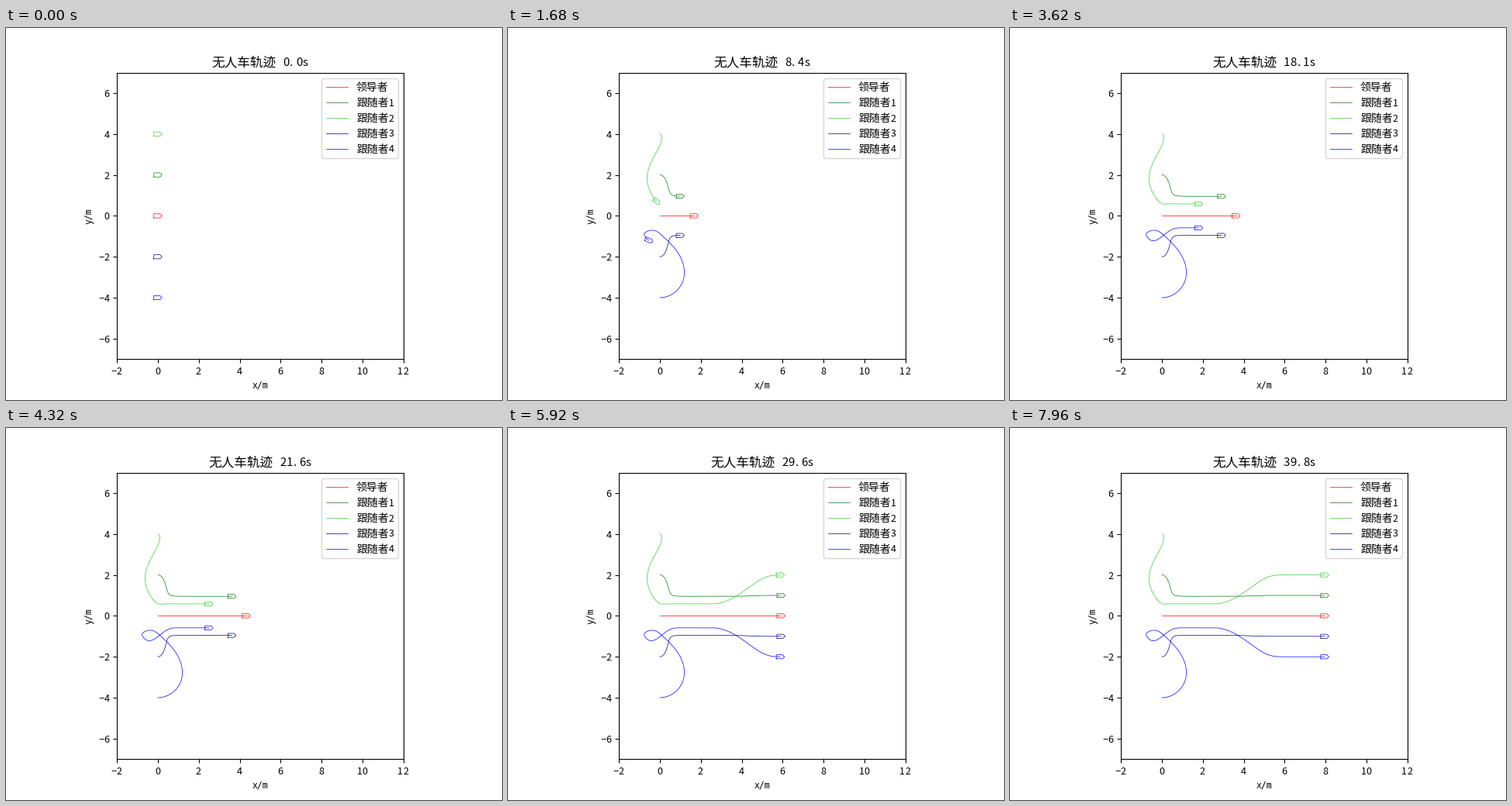
A matplotlib script that plays this animation: 640x480 px, repeating every 7980 ms.

```python
import numpy as np
import matplotlib.pyplot as plt
from matplotlib.animation import FuncAnimation
from matplotlib.patches import FancyBboxPatch

FRAMES, INTERVAL, DT = 399, 20, 0.1
SPEED, REGROUP = 0.2, 22     # leader speed in m/s, time of the second formation
UNIT = 26.4                  # pixels per metre
EM = 100 / 72                # pixels per point
CJK, SANS, MONO = "Noto Sans CJK JP", "Liberation Sans", "DejaVu Sans Mono"
COLORS = ["red", "green", "limegreen", "darkblue", "blue"]
NAMES = ["领导者", "跟随者1", "跟随者2", "跟随者3", "跟随者4"]
BODY = np.array([(-.2, -.1), (-.2, .1), (.1, .1), (.2, 0), (.1, -.1), (-.2, -.1)])

T = np.arange(FRAMES)[:, None] * DT
LEADER = np.hstack([SPEED * T, 0 * T])


def fade(t, tau, power):
    """Falls smoothly from 1 to 0, per axis."""
    return np.exp(-(np.maximum(t, 0) / np.array(tau)) ** np.array(power))


def slot(near, far, tau, power):
    """Place in the formation: the wedge opens into a line abreast."""
    near, far = np.array(near), np.array(far)
    return LEADER + far + (near - far) * fade(T - REGROUP, tau, power)


def spline(keys, v0, v1):
    """Smooth cubic curve through (time, x, y) keys with given end velocities."""
    keys = np.array(keys, float)
    kt, p = keys[:, 0], keys[:, 1:]
    h = np.diff(kt)
    d = np.diff(p, axis=0) / h[:, None]
    a, m = np.eye(len(kt)), np.zeros_like(p)
    m[0], m[-1] = v0, v1
    for i in range(1, len(kt) - 1):
        a[i, i - 1:i + 2] = h[i], 2 * (h[i - 1] + h[i]), h[i - 1]
        m[i] = 3 * (h[i] * d[i - 1] + h[i - 1] * d[i])
    m = np.linalg.solve(a, m)
    k = np.clip(np.searchsorted(kt, T[:, 0], side="right") - 1, 0, len(h) - 1)
    hk = h[k][:, None]
    s = (T - kt[k][:, None]) / hk
    return (p[k] * (1 - s) + p[k + 1] * s
            + s * (1 - s) * hk * ((m[k] - d[k]) * (1 - s) - (m[k + 1] - d[k]) * s))


def inner(side, tau_y):
    near = np.array([-.7, .955 * side])
    start = np.array([0, 2 * side])
    path = slot(near, (0, side), 1.85, 1.9)
    return path + (start - near) * fade(T, (4.74, tau_y), (2.3, 2))


def outer(side, keys, v0, join):
    near = (-1.82, .585 * side)
    path = slot(near, (0, 2 * side), (3.28, 3.45), (1.65, 2.5))
    end = (join, SPEED * join + near[0], near[1])
    entry = spline([(0, 0, 4 * side), *keys, end], (v0, 0), (SPEED, 0))
    return np.where(T < join, entry, path)


def heading(path):
    dx, dy = np.gradient(path, axis=0, edge_order=2).T
    return np.arctan2(dy, dx)


PATHS = [
    LEADER,
    inner(1, 3.45),
    outer(1, [(2, .085, 3.71), (4, -.19, 3.08), (6, -.625, 1.91),
              (8.4, -.15, .70)], .12, 10.5),
    inner(-1, 3.2),
    outer(-1, [(2, 1.08, -3.30), (4, 1.0, -2.01), (6, .095, -.95),
               (7, -.455, -.71), (7.5, -.755, -.86), (8, -.675, -1.09),
               (9, -.31, -1.20), (10.4, .17, -.875)], .7, 13.6),
]
ROUTES = [(path, heading(path)) for path in PATHS]

fig = plt.figure(figsize=(6.4, 4.8), dpi=100, facecolor="white")
ax = fig.add_subplot()
ax.set(xlim=(-2, 12), ylim=(-7, 7), aspect="equal",
       xticks=range(-2, 13, 2), yticks=range(-6, 7, 2))
ax.tick_params(labelbottom=False, labelleft=False)


def data(x, y):
    """Stage pixels (y down) to axes data."""
    return (x - 196) / UNIT, (242.4 - y) / UNIT


def write(x, y, s, size, family=CJK, ha="left", va="baseline", **kw):
    return ax.text(*data(x, y), s, fontsize=size, family=family,
                   ha=ha, va=va, zorder=6, **kw)


def cell_x(left, i, c, size):
    """Anchor of character i on a half-width grid."""
    return left + (i + (.1 if c == "." else .5)) * size * EM / 2


def cells(left, y, s, size):
    return [write(cell_x(left, i, c, size), y, c, size * .9,
                  SANS if c == "−" else CJK, "left" if c == "." else "center")
            for i, c in enumerate(s)]


def label(v):
    return str(v).replace("-", "−")


half = 5 * EM
for v in range(-2, 13, 2):
    s = label(v)
    cells(195.4 + v * UNIT - len(s) * half / 2, 447, s, 10)
for v in range(-6, 7, 2):
    s = label(v)
    cells(133.5 - len(s) * half, 242.4 - v * UNIT + 5, s, 10)
write(328, 461, "x/m", 8.3, MONO, "center", "center")
write(107, 242.5, "y/m", 8.3, MONO, "center", "center", rotation=90)

# Legend
x0, y0 = data(407.2, 168)
x1, y1 = data(506.2, 64.9)
ax.add_patch(FancyBboxPatch(
    (x0, y0), x1 - x0, y1 - y0, boxstyle=f"round,pad=0,rounding_size={2.78 / UNIT}",
    fc="white", ec="0.8", lw=1, alpha=.8, zorder=5, snap=True))
for i, (name, color) in enumerate(zip(NAMES, COLORS)):
    y = 76.3 + 19.8 * i
    (xa, yy), (xb, _) = data(413, y), data(440.8, y)
    ax.plot([xa, xb], [yy, yy], color=color, lw=.5, zorder=6)
    write(452, y + 5, name[:3], 10)
    cells(452 + 30 * EM, y + 4.7, name[3:], 10)

trails = [ax.plot([], [], color=c, lw=.5)[0] for c in COLORS]
cars = [ax.plot([], [], color=c, lw=.5)[0] for c in COLORS]
title = write(265.5, 49.4, "无人车轨迹", 12)
clock = cells(357, 49, "00.0s", 12)


def update(n):
    for (path, angle), trail, car in zip(ROUTES, trails, cars):
        trail.set_data(*path[:n + 1].T)
        c, s = np.cos(angle[n]), np.sin(angle[n])
        car.set_data(*(BODY @ np.array([(c, s), (-s, c)]) + path[n]).T)

    text = f"{n * DT:.1f}s"
    left = 328 - (11 + len(text)) * 3 * EM
    title.set_x(data(left, 0)[0])
    for i, glyph in enumerate(clock):
        ch = text[i] if i < len(text) else ""
        glyph.set_text(ch)
        glyph.set_ha("left" if ch == "." else "center")
        glyph.set_x(data(cell_x(left, 11 + i, ch, 12), 0)[0])
    return trails + cars + [title] + clock


anim = FuncAnimation(fig, update, frames=FRAMES, interval=INTERVAL, repeat=True)
plt.show()
```
